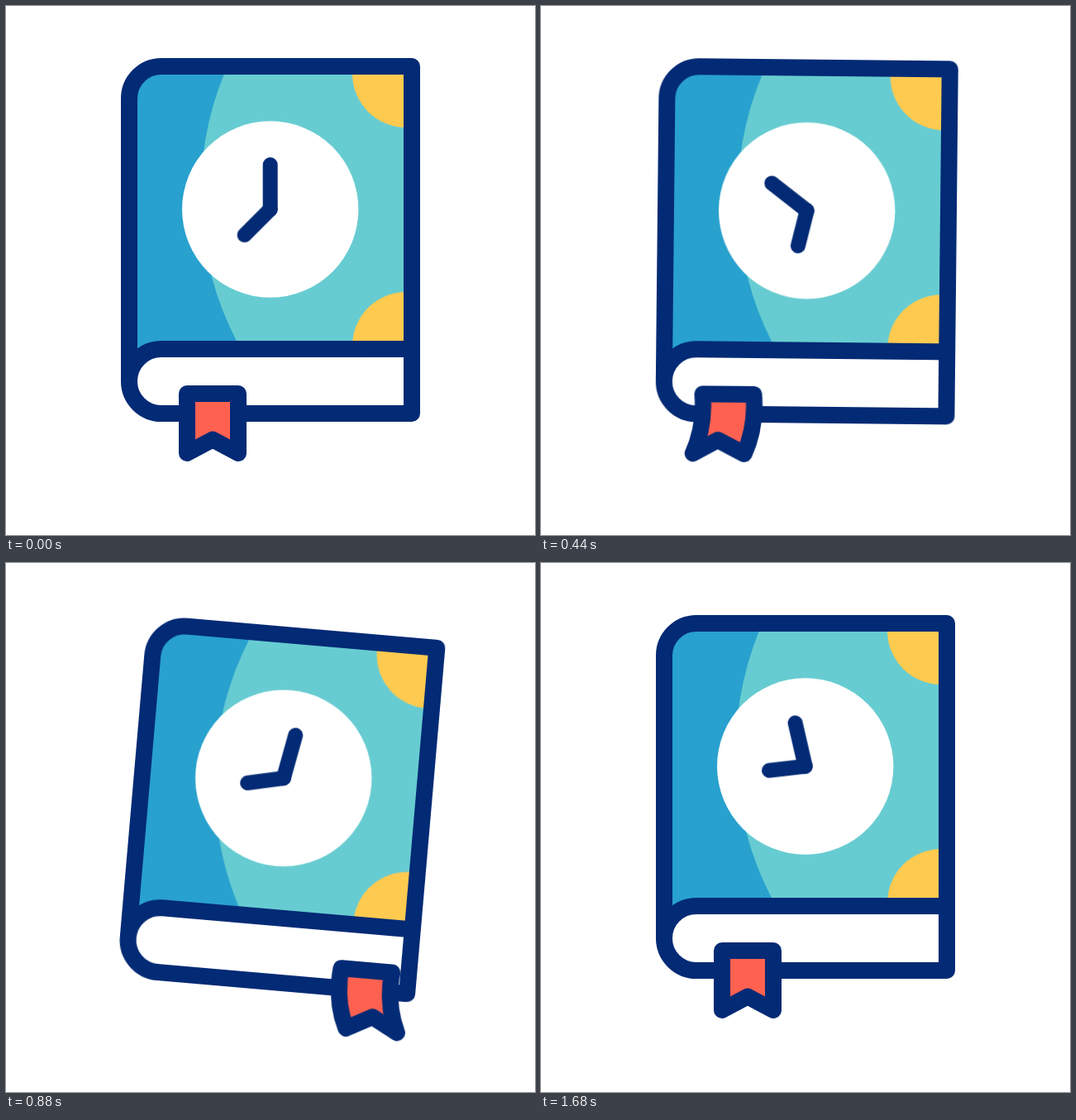
Recreate the animation shown at these times as an HTML page without scripts. Size 640x640 px, loop 2200 ms.

```html
<!DOCTYPE html>
<html lang="en">
<head>
<meta charset="utf-8">
<title>Book with clock</title>
<style>
  html, body { margin: 0; width: 100%; height: 100%; overflow: hidden; background: #fff; }
  svg { display: block; width: 100vw; height: 100vh; }

  .line { fill: none; stroke: #032a75; stroke-width: 20; stroke-linecap: round; stroke-linejoin: round; }
  .hand { stroke-width: 18; }

  .book, .slide, .ribbon, .hand {
    animation: 2.2s cubic-bezier(.333, 0, .667, 1) infinite;
  }
  .book { transform-origin: 162px 439px; animation-name: tilt; }
  .slide { animation-name: slide; }
  .ribbon { fill: #ff6150; animation-name: sway; }
  .hand { transform-origin: 319.7px 246px; }
  .minute { animation-name: minute; }
  .hour { animation-name: hour; }

  @keyframes tilt {
    0% { transform: rotate(0deg); }
    12.3% { transform: rotate(-10deg); }
    29.2% { transform: rotate(14.2deg); }
    47.2%, 100% { transform: rotate(0deg); }
  }
  @keyframes slide {
    0% { transform: translateX(0px); }
    10.9%, 18.64% { transform: translateX(-36px); }
    28.36%, 41.8% { transform: translateX(190px); }
    53.6%, 100% { transform: translateX(0px); }
  }
  /* The top edge stays put while the tails swing sideways. */
  @keyframes sway {
    0%, 73.6%, 100% { d: path("M219 469Q219 508 219 541L250 524.5L281 541Q281 508 281 469Z"); }
    5% { d: path("M219 469Q217 508 225 541L256 524.5L287 541Q279 508 281 469Z"); }
    18.6%, 26.4%, 60.5% { d: path("M219 469Q222.5 508 208 541L238 524.5L270 541Q284.5 508 281 469Z"); }
    40.5% { d: path("M219 469Q215 508 231 541L262 524.5L293 541Q277 508 281 469Z"); }
  }
  @keyframes minute {
    0% { transform: rotate(0deg); }
    12.3%, 18.73% { transform: rotate(-57deg); }
    30.9%, 32.7% { transform: rotate(81deg); }
    46.4% { transform: rotate(-46deg); }
    60.9%, 100% { transform: rotate(-13deg); }
  }
  @keyframes hour {
    0% { transform: rotate(225deg); }
    12.3%, 18.73% { transform: rotate(189deg); }
    30.9%, 32.7% { transform: rotate(329deg); }
    46.4% { transform: rotate(200deg); }
    63.9%, 100% { transform: rotate(263.5deg); }
  }
</style>
</head>
<body>
<svg viewBox="0 0 640 640">
  <g class="book">
    <path fill="#28a1ce" d="M491 73H188A39 39 0 0 0 149 112V454A39 39 0 0 1 188 415H491Z"/>
    <path fill="#67ccd1" d="M264 82A386 386 0 0 0 279.4 406H491V82Z"/>
    <g fill="#ffca50">
      <path d="M419 82a65 65 0 0 0 65 65V82Z"/>
      <path d="M419 411a65 65 0 0 1 65-65V411Z"/>
    </g>
    <path class="line" d="M491 415H188a39 39 0 0 0 0 78H491V73H188A39 39 0 0 0 149 112V454"/>

    <circle cx="319.7" cy="246" r="106.7" fill="#fff"/>
    <path class="line hand minute" d="M319.7 246v-54"/>
    <path class="line hand hour" d="M319.7 246v-44"/>

    <g class="slide">
      <path class="line ribbon" d="M219 469Q219 508 219 541L250 524.5L281 541Q281 508 281 469Z" style="fill:#ff6150"/>
    </g>
  </g>
</svg>
</body>
</html>
```
